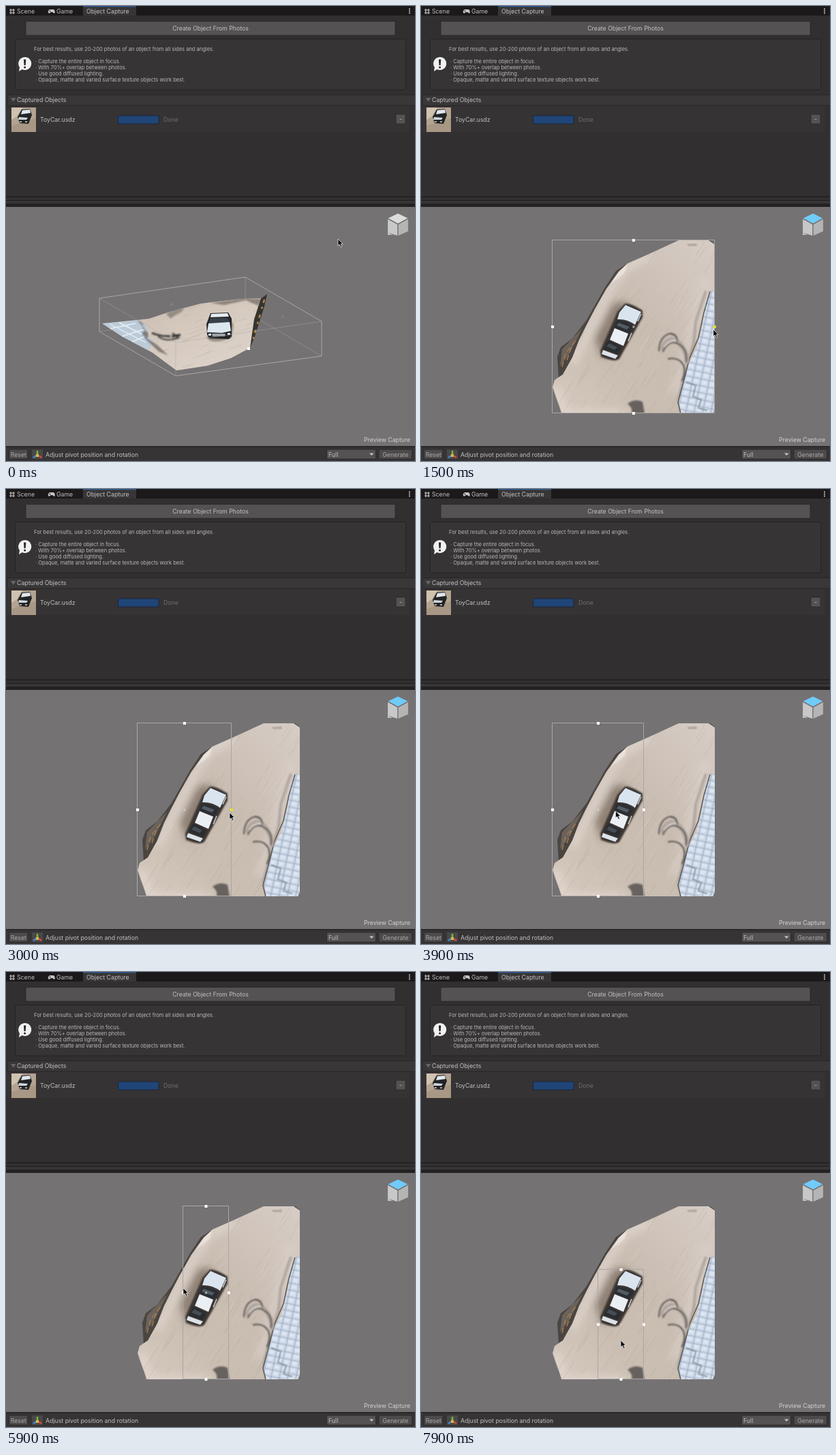
Write an HTML page that moves like this. It is 600 px wide and 668 px high and loops after 8000 ms.

```html
<!DOCTYPE html>
<html lang="en">
<head>
<meta charset="utf-8">
<title>Object Capture</title>
<style>
  html, body { margin: 0; width: 100%; height: 100%; overflow: hidden; background: #322f30; }
  svg { display: block; width: 100%; height: 100%; }
  text { font: 8.75px Inter, Roboto, sans-serif; fill: #c2c0c1; white-space: pre; }
  .help { font-size: 7.53px; fill: #bab8b9; }
  .dim { fill: #aaa8a9; }
  .wire { fill: none; stroke: #a9a6a6; stroke-width: 1; }
</style>
</head>
<body>
<svg id="stage" viewBox="0 0 600 668">
  <defs>
    <linearGradient id="sand" x1="0" y1="1" x2="1" y2="0">
      <stop offset="0" stop-color="#d6cac0"/><stop offset=".3" stop-color="#cabdb1"/>
      <stop offset=".55" stop-color="#c9bcb1"/><stop offset="1" stop-color="#d7cdc6"/>
    </linearGradient>
    <linearGradient id="sandSide" x1="0" y1="0" x2="1" y2="1">
      <stop offset="0" stop-color="#c0b2a6"/><stop offset=".5" stop-color="#d6cabf"/>
      <stop offset="1" stop-color="#ded5cd"/>
    </linearGradient>
    <pattern id="tiles" width="12" height="10" patternUnits="userSpaceOnUse" patternTransform="rotate(12)">
      <rect width="12" height="10" fill="#a9b5c6"/>
      <rect x=".6" y=".6" width="10.800" height="8.800" rx="1.500" fill="#ccd8e8"/>
      <rect x="2" y="2" width="7" height="5" rx="2" fill="#dce5f1"/>
    </pattern>
    <filter id="soft" x="-50%" y="-50%" width="200%" height="200%"><feGaussianBlur stdDeviation="6"/></filter>
    <filter id="smooth" x="-30%" y="-30%" width="160%" height="160%"><feGaussianBlur stdDeviation=".8"/></filter>
    <clipPath id="topClip"><path id="topShape" d="M378 344H424L431 349V591L428 598H206L203 588L197 572L193 560L196 549L208 541L222 516L232 490L243 468L255 445L272 415L290 390L303 378L328 367Z"/></clipPath>
    <clipPath id="sideClip"><path d="M141 466L192 461L210 459L240 449L285 437L300 435L345 430L374 429L364 460L358 502L330 517L296 528L250 535L235 524L215 509L170 485Z"/></clipPath>
  </defs>

  <g id="panel"></g>
  <rect y="295" width="600" height="352" fill="#747273"/>

  <g id="sideView">
    <path class="wire" d="M351 398V448M137 478L351 448L463 514" opacity=".45"/>
    <path d="M359 433L375 429L383 423L379 441L365 485L358 502L355 494L360 467Z" fill="#37332f"/>
    <path d="M379 431L362 491" stroke="#b58a4a" stroke-width="2.5" stroke-dasharray="5 6 3 9"/>
    <g clip-path="url(#sideClip)">
      <rect x="135" y="420" width="250" height="120" fill="url(#sandSide)"/>
      <g id="sideGrain"></g>
      <path d="M141 466L194 461L208 473L204 482L216 491L210 506L175 489Z" fill="#bccbd9"/>
      <g fill="none" stroke="#e8eff5" stroke-width="1.4"><path d="M152 467L205 494M166 465L210 487M151 474L190 466M170 485L204 474M185 493L211 482"/></g>
      <path d="M193 462Q204 465 200 473Q214 482 207 488L222 498L238 513L224 507L207 491L199 481L205 475Z" fill="#65625f" opacity=".75" filter="url(#smooth)"/>
      <path d="M235 452Q246 444 262 444L256 450Q246 454 242 459Z" fill="#7d746d" opacity=".7" filter="url(#smooth)"/>
      <path d="M300 436L350 429L376 430L370 440L352 432L320 439Z" fill="#554d46" opacity=".55" filter="url(#smooth)"/>
    </g>
    <g filter="url(#smooth)" fill="none" stroke="#393838">
      <path d="M214 480Q225 485 241 485" stroke-width="3"/>
      <path d="M223 485Q235 494 253 487L244 480" stroke-width="2"/>
      <path d="M243 485L256 483" stroke-width="3.5"/>
    </g>
    <path d="M294 487Q303 498 331 487L334 468L325 452Z" fill="#75695f" opacity=".65" filter="url(#smooth)"/>
    <path d="M300 451L326 450L331 459V485L327 489L298 488L295 482L294 467Z" fill="#242629"/>
    <path d="M301 452L325 451L327 456L300 457Z" fill="#e6edf3"/>
    <path d="M300 458L325 458L328 464L297 466Z" fill="#3a4047"/>
    <path d="M297 466L328 464L330 477L317 480L295 479Z" fill="#dce7ee"/>
    <path d="M302 481L322 481L321 485L303 485Z" fill="#9ba5ab"/>
    <path d="M297 481h4v3h-4zM325 480h4v3h-4z" fill="#d9e0e4"/>
    <path class="wire" d="M137 429L351 398L463 463V514L249 543L137 478Z"/>
    <path class="wire" d="M137 429L249 494L463 463M249 494V543" opacity=".45"/>
    <path d="M241.500 436.500h3v3h-3zM404.500 454.500h3v3h-3z" fill="#858384"/>
    <rect x="354" y="501" width="4" height="4" fill="#fff"/>
  </g>

  <g id="topView">
    <path d="M303 378L286 389L270 413L243 461L222 488L205 501L200 515L202 547L212 542L235 493L250 460L275 415Z" fill="#4b4541"/>
    <path d="M237 473L219 491L207 504L204 529L218 510Z" fill="#6b625b"/>
    <path d="M207 530L212 510L228 490M214 520L221 500" stroke="#a37b50" stroke-width="1.500" fill="none" stroke-dasharray="8 4"/>
    <use href="#topShape" fill="url(#sand)"/>
    <g clip-path="url(#topClip)">
      <g filter="url(#soft)" fill="none">
        <path d="M196 560L212 600H300" stroke="#e4dad2" stroke-width="14" opacity=".7"/>
        <path d="M335 366L300 384L270 430L222 525" stroke="#e6ded8" stroke-width="13" opacity=".6"/>
        <path d="M418 400L398 470L372 570" stroke="#dcd2cb" stroke-width="14" opacity=".6"/>
        <path d="M254 488L282 434L306 436L268 520Z" fill="#68594d" opacity=".6"/>
      </g>
      <g id="topGrain"></g>
      <path d="M303 377L299 391L288 401L278 408L290 390Z" fill="#efe8e2" opacity=".8" filter="url(#smooth)"/>
      <path d="M418 418L403 463L400 495L387 540L378 576L382 598" fill="none" stroke="#8f8883" stroke-width="4" opacity=".5" filter="url(#smooth)"/>
      <path d="M425 418H431V598H381L377 584L384 552L393 524L404 504L413 467L417 436Z" fill="url(#tiles)"/>
      <path d="M424 419L415 450L407 487L394 517L386 548L377 582L381 598" fill="none" stroke="#5c5958" stroke-width="1.500"/>
      <path d="M389 552L403 557L399 573L411 578L407 590L420 594" fill="none" stroke="#8993a0" stroke-width="3" opacity=".6"/>
      <path d="M303 584Q313 576 325 581L328 598H309Q311 590 303 584Z" fill="#68625f" filter="url(#smooth)"/>
      <path d="M422 344H431V350Z" fill="#393634"/>
      <path d="M391 350L404 349V352H392Z" fill="#c1b5aa" stroke="#a1968b" stroke-width=".7"/>
      <path d="M193 560L197 572L206 598" fill="none" stroke="#8b8178" stroke-width="1"/>
    </g>
    <g fill="none" stroke-linecap="round" filter="url(#smooth)">
      <path d="M354 502Q363 482 379 495Q390 507 390 522" stroke="#b0a69f" stroke-width="7"/>
      <path d="M349 506Q350 485 365 481Q375 481 376 492M355 507Q366 486 382 499Q391 507 389 522M363 518Q378 515 385 527Q389 539 383 550" stroke="#474442" stroke-width="1.8"/>
      <path d="M357 500Q364 490 374 491" stroke="#dbd5cf" stroke-width="2"/>
    </g>
    <path d="M299 437Q306 435 325 447L325 457L310 484L291 518Q285 524 264 515L263 506L278 472L288 449Z" fill="#3a3633" filter="url(#smooth)"/>
    <path d="M300 439L323 449L314 468Q302 459 288 460L291 450Z" fill="#d9e4ef"/>
    <path d="M287 462Q300 461 312 470L305 481L284 472Z" fill="#2b2f34"/>
    <path d="M290 465L306 471L302 475L287 469Z" fill="#535b63"/>
    <path d="M284 473L304 481L297 499L277 490Z" fill="#eaeff4"/>
    <path d="M275 491L294 501L289 511L268 503Z" fill="#2a2d30"/>
    <path d="M276 495L288 501L284 505L272 500Z" fill="#464d53"/>
    <path d="M267 505L289 513L285 518L265 511Z" fill="#dbe2e8"/>
    <path d="M318 463L323 452M304 492L309 480" stroke="#dce1e5" stroke-width="1.3"/>
    <g id="selection"></g>
  </g>

  <g id="cube" stroke="#747273" stroke-width="1.2" stroke-linejoin="round">
    <path id="cubeTop" d="M575 304L590.500 311.500L575 320L559.500 311.500Z"/>
    <path d="M559.500 312L575 320.500V338L559.500 333Z" fill="#c9c8c8"/>
    <path d="M590.500 312L575 320.500V338L590.500 331Z" fill="#b6b5b5"/>
    <path d="M560 332.500L567 336H560Z" fill="#c9c8c8" stroke="none"/>
  </g>
  <text x="525" y="640" style="fill:#d2d0d1">Preview Capture</text>
  <g id="toolbar"></g>
  <path id="cursor" d="M0 0V10L2.300 8L4.200 12L6 11.200L4.200 7.400H7.300Z" fill="#050505" stroke="#e8e8e8" stroke-width=".8"/>
</svg>
<script>
const LOOP = 8000, STEP = 100;
const $ = id => document.getElementById(id);
const rect = (x, y, w, h, fill, extra = "") =>
  `<rect x="${x}" y="${y}" width="${w}" height="${h}" fill="${fill}" ${extra}/>`;
const label = (x, y, text, extra = "") => `<text x="${x}" y="${y}" ${extra}>${text}</text>`;
const button = (x, y, w, h, fill = "#555253") =>
  rect(x, y, w, h, fill, 'rx="1.5" stroke="#292627" stroke-width=".8"');

function drawPanel() {
  const tips = ["Capture the entire object in focus.", "With 70%+ overlap between photos.",
    "Use good diffused lighting.", "Opaque, matte and varied surface texture objects work best."];
  $("panel").innerHTML =
    rect(0, 0, 600, 295, "#322f30") + rect(0, 0, 600, 14, "#1b191a") +
    rect(113, 0, 78, 14, "#383536") + rect(113, 0, 78, 1.3, "#2c5d95") +
    `<path d="M7 4V12M11 4V12M5 6H13M5 10H13" stroke="#c6c4c5" stroke-width="1.2"/>` +
    label(16, 11, "Scene") +
    `<path d="M64 5H70Q73 8 71 11L68 9H66L63 11Q60 8 64 5Z" fill="#c6c4c5"/>` +
    `<path d="M63.500 7.500h2M64.500 6.500v2" stroke="#1b191a" stroke-width=".7"/>` +
    label(74, 11, "Game") + label(118, 11, "Object Capture") +
    [4, 7, 10].map(y => rect(591, y - .5, 1.8, 1.8, "#d0cecf")).join("") +
    button(29, 22.5, 542, 20.5) + label(300, 36, "Create Object From Photos", 'text-anchor="middle"') +
    rect(13.5, 48.5, 573, 74.5, "#373435", 'rx="2" stroke="#252223"') +
    `<path d="M27.500 75a9.500 9.500 0 1 1-4 18L19 96L20 90A9.500 9.500 0 0 1 27.500 75Z" fill="#f1f1f1"/>` +
    `<path d="M26 78.500H29.300L28.700 87H26.600Z" fill="#242122"/><circle cx="27.600" cy="90" r="1.500" fill="#242122"/>` +
    label(41, 66, "For best results, use 20-200 photos of an object from all sides and angles.", 'class="help"') +
    tips.map((tip, i) => label(43, 84 + i * 9, "· " + tip, 'class="help"')).join("") +
    rect(2, 130.5, 600, 15.5, "#3a3738", 'stroke="#272425" stroke-width=".8"') +
    `<path d="M7 135H14.500L10.700 140.500Z" fill="#696667"/>` +
    label(16, 141.3, "Captured Objects") +
    rect(2, 147, 590, 38, "#363334") + thumbnail() +
    label(50, 169.7, "ToyCar.usdz") +
    rect(164.5, 161, 59.5, 12, "#204578", 'stroke="#18263d"') +
    label(231, 169.7, "Done", 'style="fill:#716e6f"') +
    button(572, 159, 14, 14) + label(579, 169, "-", 'text-anchor="middle"') +
    rect(0, 279.5, 600, 1.5, "#211e1f") + rect(0, 285, 600, 1, "#211e1f") +
    rect(0, 286, 600, 4, "#383536") + rect(0, 290, 600, 5, "#242122");
}

function thumbnail() {
  return rect(8, 149, 36, 36, "#b4a391") +
    `<path d="M8 149H24L16 162L8 167Z" fill="#d0c2b0"/>` +
    `<path d="M8 176L44 165V185H8Z" fill="#a18f7c" opacity=".6"/>` +
    `<path d="M17 163L23 152L35 151L38 160L33 173L20 172Z" fill="#222426"/>` +
    `<path d="M24 153L35 152L36 157L22 159Z" fill="#dfe7ed"/>` +
    `<path d="M19 163L32 164L30 167L18 167Z" fill="#cdd6dc"/>` +
    `<path d="M20 169H23V171H20ZM28 169H31V171H28Z" fill="#a7a9a9"/>`;
}

function drawToolbar() {
  $("toolbar").innerHTML =
    rect(0, 646, 600, 22, "#373435") + rect(0, 646, 600, 1.5, "#252223") +
    button(4.5, 651, 27.5, 14, "#4e4b4c") + label(18.3, 661.5, "Reset", 'class="dim" text-anchor="middle"') +
    rect(38, 651, 16, 14, "#4a4748") +
    `<g stroke-width="2.600"><path d="M46 659V653" stroke="#77b83c"/><path d="M46 659L40 663" stroke="#4388d0"/><path d="M46 659L52 663" stroke="#d24a3d"/></g>` +
    `<path d="M44 658H48V662H44Z" fill="#d9b842"/>` +
    label(58, 661.5, "Adjust pivot position and rotation") +
    button(470.5, 651, 72, 14) + label(473, 661.5, "Full") +
    `<path d="M533 656.500H539.500L536.250 660Z" fill="#c6c4c5"/>` +
    button(547, 651, 48.5, 14, "#4e4b4c") + label(571.3, 661.5, "Generate", 'class="dim" text-anchor="middle"');
}

function grain(id, count, [x, y, w, h], [dx, dy]) {
  let seed = 17;
  const random = () => (seed = seed * 16807 % 2147483647) / 2147483647;
  let marks = "";
  for (let i = 0; i < count; i++) {
    const px = x + random() * w, py = y + random() * h, length = .3 + random();
    marks += `<path d="M${px.toFixed(1)} ${py.toFixed(1)}l${(dx * length).toFixed(1)} ${(dy * length).toFixed(1)}" stroke="${random() < .5 ? "#9c8e82" : "#eee5dc"}"/>`;
  }
  $(id).innerHTML = `<g opacity=".25" stroke-width=".8">${marks}</g>`;
}

const drag = (start, end, from, to) => ({ start, end, from, to });
const rightDrag = drag(1450, 3200, 431, 327);
const leftDrag = drag(4850, 5850, 193, 260);
const topDrag = drag(6500, 7400, 344, 437);
const HOVER_AT = 400, TOP_VIEW_AT = 600, LAG = 100;

const smooth = k => k * k * (3 - 2 * k);
const active = (d, t) => t >= d.start && t < d.end;
function dragged({ start, end, from, to }, t) {
  const k = Math.min(1, Math.max(0, (t - start) / (end - start)));
  return from + (to - from) * smooth(k);
}

// The pointer leads the dragged edge by one step.
const pointerStops = [
  [0, 487, 342], [400, 577, 313], [850, 577, 313],
  [rightDrag.start - LAG, 431, 475], [rightDrag.end - LAG, 327, 475],
  [3400, 327, 475], [leftDrag.start - LAG, 193, 468], [leftDrag.end - LAG, 260, 464],
  [5900, 260, 464], [topDrag.start - LAG, 293, 343], [topDrag.end - LAG, 293, 437],
  [7450, 293, 437], [8200, 293, 597]
];

function pointerAt(t) {
  const next = pointerStops.findIndex(stop => stop[0] > t);
  const [t0, x0, y0] = pointerStops[next - 1], [t1, x1, y1] = pointerStops[next];
  const k = smooth((t - t0) / (t1 - t0));
  return [x0 + (x1 - x0) * k, y0 + (y1 - y0) * k];
}

function drawSelection(t) {
  const right = dragged(rightDrag, t), left = dragged(leftDrag, t), top = dragged(topDrag, t);
  const bottom = 598, midX = (left + right) / 2, midY = (top + bottom) / 2;
  const handle = (x, y, hot) => rect(x - 2, y - 2, 4, 4, hot ? "#e5df25" : "#fff");
  const crisp = v => Math.round(v) - .5;
  $("selection").innerHTML =
    `<path class="wire" d="M${crisp(left)} ${crisp(top)}H${crisp(right)}V${bottom - .5}H${crisp(left)}Z"/>` +
    rect(midX - 1.5, midY - 1.5, 3, 3, "#d9d7d5", 'opacity=".7"') +
    handle(midX, top, active(topDrag, t)) + handle(midX, bottom) +
    handle(left, midY, active(leftDrag, t)) + handle(right, midY, active(rightDrag, t));
}

function render(t) {
  const fromTop = t >= TOP_VIEW_AT;
  $("sideView").style.display = fromTop ? "none" : "";
  $("topView").style.display = fromTop ? "" : "none";
  $("cubeTop").setAttribute("fill", t >= HOVER_AT ? "#70cbf8" : "#dddcdc");
  drawSelection(t);
  $("cursor").setAttribute("transform", `translate(${pointerAt(t)})`);
}

let shown = -1;
function tick(now) {
  const t = Math.floor((now % LOOP) / STEP) * STEP;
  if (t !== shown) render(shown = t);
  requestAnimationFrame(tick);
}

drawPanel();
drawToolbar();
grain("topGrain", 190, [190, 345, 235, 280], [17, -27]);
grain("sideGrain", 100, [190, 430, 180, 105], [24, -8]);
render(0);
requestAnimationFrame(tick);
</script>
</body>
</html>
```
